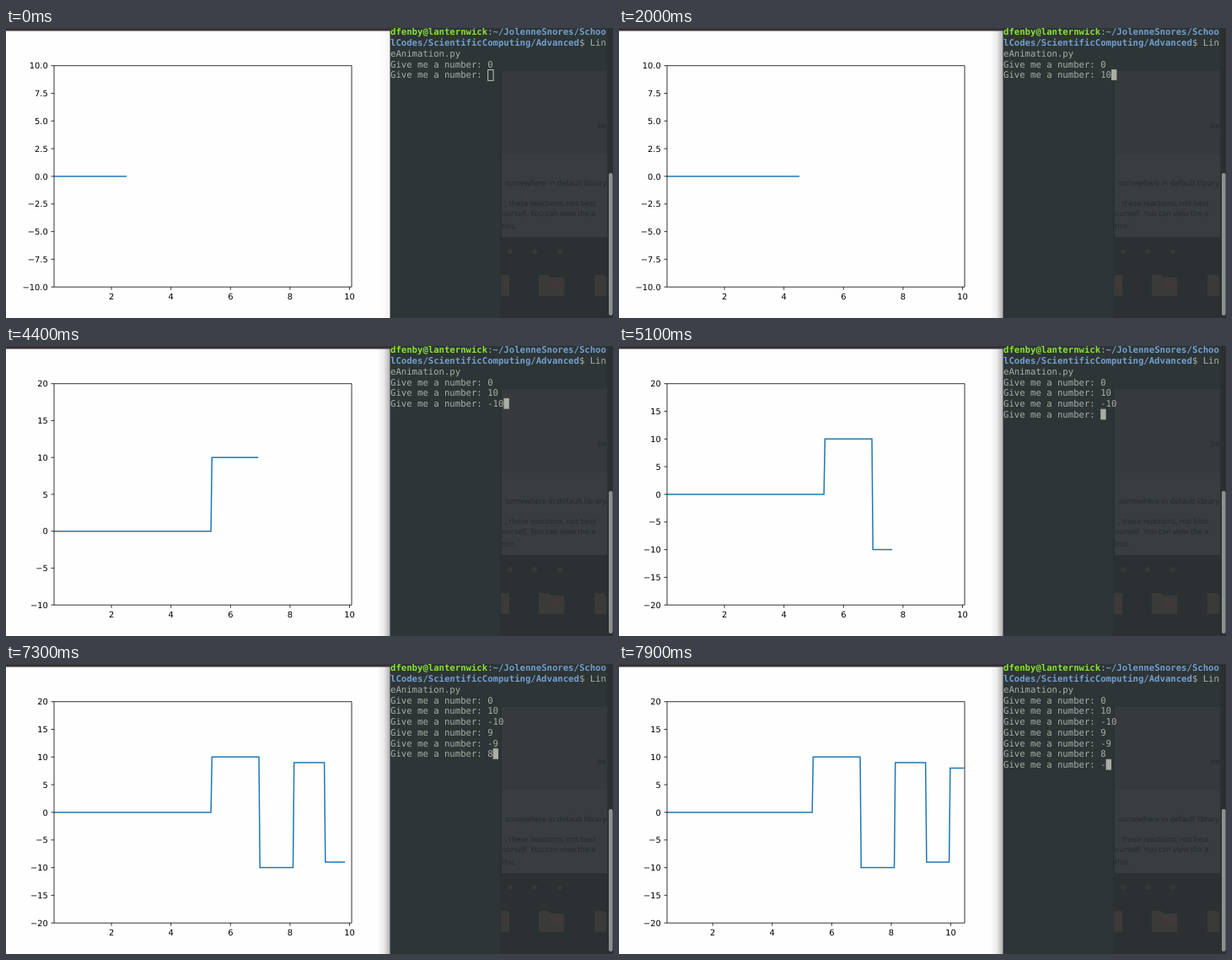
Animation of 720 by 344 pixels, one loop 8000 ms. Source, as an HTML page:

```html
<!DOCTYPE html>
<html>
<head>
<meta charset="utf-8">
<style>
html, body { margin: 0; width: 100%; height: 100%; overflow: hidden; background: #fefefe }
svg { display: block }
text { text-rendering: geometricPrecision; white-space: pre }
.axes { font: 9.88px "DejaVu Sans", sans-serif }
.axes path { stroke: #000; stroke-width: .8; fill: none }
.term { font: 10.63px "DejaVu Sans Mono", monospace; fill: #a9aea7 }
.term .user { fill: #8ae234; font-weight: bold }
.term .path { fill: #729fcf; font-weight: bold }
.ghost { font: 9px "Open Sans", sans-serif; fill: #242a2b }
</style>
</head>
<body>
<svg width="720" height="344" viewBox="0 0 720 344">
  <defs>
    <linearGradient id="shade">
      <stop offset="0" stop-opacity="0"/>
      <stop offset=".5" stop-opacity=".07"/>
      <stop offset="1" stop-opacity=".32"/>
    </linearGradient>
    <clipPath id="plot"><rect x="57" y="44.7" width="353" height="262.5"/></clipPath>
  </defs>
  <rect width="720" height="344" fill="#fefefe"/>
  <rect width="456" height="3.5" fill="#3a3238"/>
  <g class="axes">
    <path id="line" clip-path="url(#plot)" style="stroke:#1f77b4;stroke-width:1.5"/>
    <path d="M57 44.7H410V307.2H57Z"/>
    <g id="ticks"></g>
  </g>
  <rect id="shadow" x="440" y="3.5" width="16" height="341" fill="url(#shade)"/>
  <rect x="455.5" width="265" height="344" fill="#2e3536"/>
  <rect x="586" y="51" width="128" height="293" fill="#2b3132"/>
  <rect x="588" y="51" width="125.5" height="197" fill="#353b3d"/>
  <rect x="588" y="150" width="125.5" height="98" fill="#383e40"/>
  <g class="ghost">
    <text x="592" y="187">somewhere in default library</text>
    <text x="592" y="211">, these reactions, not best</text>
    <text x="588" y="223">ourself. You can view the a</text>
    <text x="588" y="238">this.</text>
    <text x="702" y="119">be</text>
  </g>
  <g fill="#343939">
    <circle cx="598" cy="265" r="3"/><circle cx="627" cy="265" r="3"/><circle cx="657" cy="265" r="3"/>
  </g>
  <g fill="#3a3a39">
    <path d="M587 293H597V318H587ZM632 293H643L646 296H662V318H632ZM698 293H709L712 296V318H698Z"/>
    <path d="M646 299H662V309H646ZM590 299H597V309H590Z" fill="#40393a"/>
  </g>
  <rect x="713.5" width="7" height="344" fill="#2a3031"/>
  <rect x="715" y="172" width="4.5" height="169" rx="2.2" fill="#8d9191"/>
  <g class="term">
    <text x="456" y="8.3"><tspan class="user">dfenby@lanternwick</tspan>:<tspan class="path">~/JolenneSnores/Schoo</tspan></text>
    <text x="456" y="21"><tspan class="path">lCodes/ScientificComputing/Advanced</tspan>$ Lin</text>
    <text x="456" y="33.8">eAnimation.py</text>
    <g id="prompts"></g>
    <rect id="cursor" width="6.4" height="12.7"/>
  </g>
</svg>
<script>
const $ = id => document.getElementById(id);
const LOOP = 8000, FOCUS = 200, PROMPT = 'Give me a number: ';
const ROW = 12.75, CHAR = 6.4;

// [time, key]; "|" is Enter
const keys = [
  [0, '0'], [0, '|'], [1500, '1'], [1800, '0'], [2900, '|'],
  [3800, '-'], [4000, '1'], [4200, '0'], [4500, '|'],
  [5200, '9'], [5600, '|'], [6200, '-'], [6400, '9'], [6700, '|'],
  [7100, '8'], [7500, '|'], [7800, '-']
];
// [x where the value changes, new value]
const steps = [[243.1, 10], [300, -10], [340.5, 9], [377.6, -9], [405.6, 8]];

function axisFor(t) {
  if (t < 2900) return { lo: -10, hi: 10, gap: 2.5, digits: 1 };
  return { lo: t < 4500 ? -10 : -20, hi: 20, gap: 5, digits: 0 };
}

function drawPlot(t) {
  const { lo, hi, gap, digits } = axisFor(t);
  const head = 143 + t * .0355;
  const shift = Math.max(0, head - 409.5);
  const py = v => 307.2 - (v - lo) / (hi - lo) * 262.5;

  let d = `M40 ${py(0)}`, last = 0;
  for (const [x, v] of steps) {
    if (head < x + 1.2) break;
    d += `H${x - shift}L${x + 1.2 - shift} ${py(v)}`;
    last = v;
  }
  $('line').setAttribute('d', d + `H${head - shift}`);

  let out = '';
  for (let v = lo; v <= hi; v += gap) {
    const label = v.toFixed(digits).replace('-', '\u2212');
    out += `<path d="M53.5 ${py(v)}H57"/><text x="49.8" y="${py(v) + 3.7}" text-anchor="end">${label}</text>`;
  }
  for (let v = 2; v <= 10; v += 2) {
    const x = 125.1 + 35.3 * (v - 2) - shift;
    out += `<path d="M${x} 307.2V310.7"/><text x="${x}" y="321.7" text-anchor="middle">${v}</text>`;
  }
  $('ticks').innerHTML = out;
}

function drawTerminal(t) {
  const lines = keys.filter(k => k[0] <= t).map(k => k[1]).join('').split('|');
  $('prompts').innerHTML = lines.map((s, i) =>
    `<text x="456" y="${46.5 + ROW * i}">${PROMPT}${s}</text>`).join('');

  const row = lines.length - 1, focused = t >= FOCUS, inset = focused ? 0 : .5;
  const attrs = {
    x: 456 + CHAR * (PROMPT.length + lines[row].length) + inset,
    y: 36.4 + ROW * row + inset,
    fill: focused ? '#a9aea7' : 'none',
    stroke: focused ? 'none' : '#c3c7c1'
  };
  for (const name in attrs) $('cursor').setAttribute(name, attrs[name]);
  $('shadow').setAttribute('opacity', focused ? 1 : .15);
}

let shown = -1;
function frame(now) {
  const t = Math.floor(now % LOOP / 100) * 100;
  if (t !== shown) {
    shown = t;
    drawPlot(t);
    drawTerminal(t);
  }
  requestAnimationFrame(frame);
}
frame(0);
</script>
</body>
</html>
```
